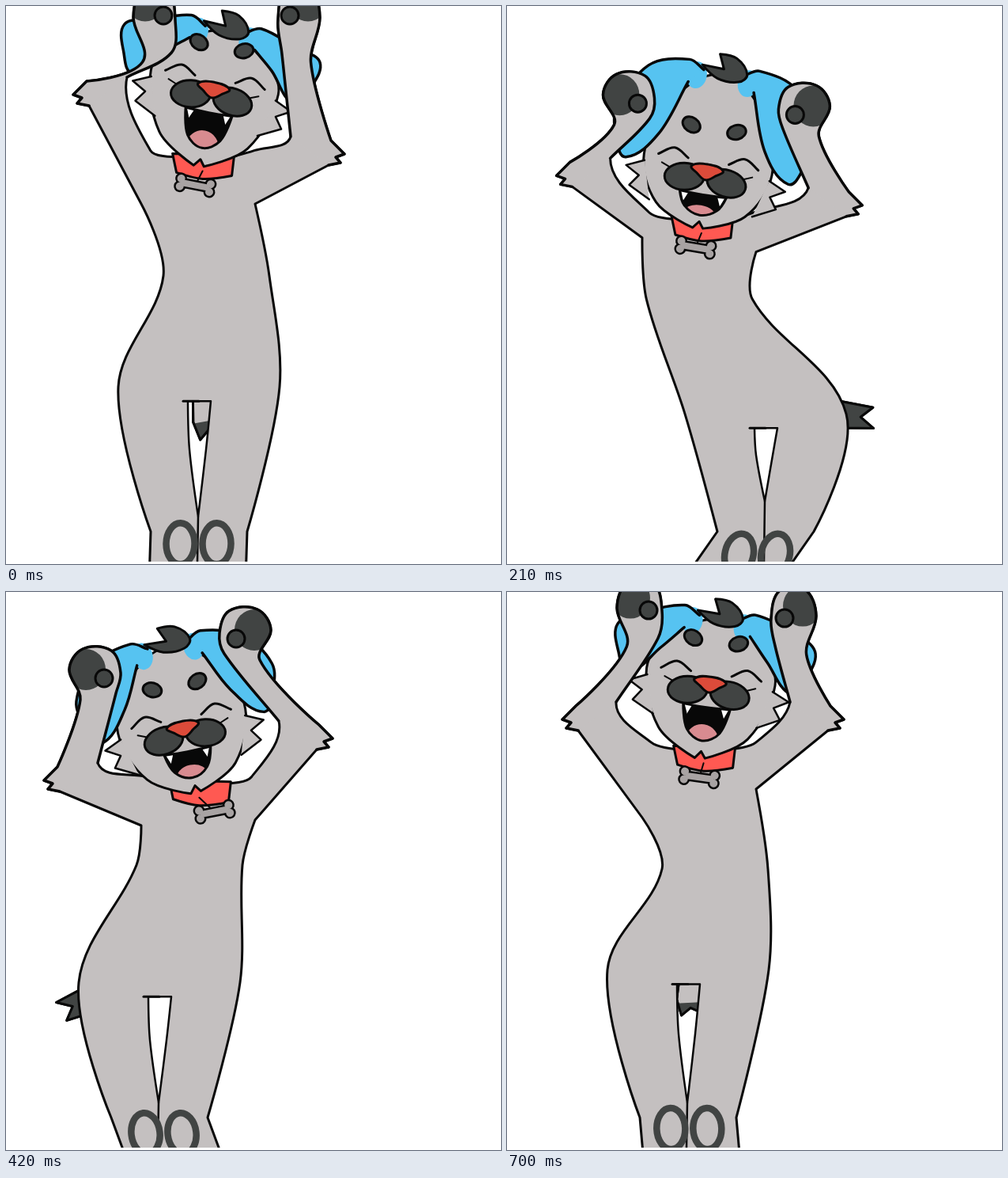
These frames come from a looping animation (626x705 px, 0.77 s). An HTML page with a canvas:

```html
<!DOCTYPE html>
<html lang="en">
<head>
<meta charset="utf-8">
<title>Dancing dog</title>
<style>
html, body { margin: 0; width: 100%; height: 100%; overflow: hidden; background: #fff; }
canvas { display: block; width: 626px; height: 705px; }
</style>
</head>
<body>
<canvas id="stage" width="626" height="705"></canvas>
<script>
const ctx = document.getElementById('stage').getContext('2d');
const STEP = 70, STEPS = 11, FLOOR = 702, RAD = Math.PI / 180;
const FUR = '#c4c0c0', DARK = '#414443', INK = '#080808', BLUE = '#56c3f1',
  RED = '#ff5952', NOSE = '#dc4b3a', TONGUE = '#d88b90';

// Key poses of the rig's joints; everything else hangs on these.
const KEYS = [0, 1, 2, 4, 6, 8, 10];
const tracks = {
  headX: [260, 258, 257, 243, 226, 238, 255], headY: [116, 189, 256, 168, 183, 222, 127],
  tilt: [11, 16, 15, 2, -11, -6, 8], chin: [86, 68, 50, 74, 70, 71, 82],
  handLX: [188, 172, 160, 148, 113, 105, 168], handLY: [20, 60, 160, 60, 102, 155, 25],
  handRX: [370, 383, 392, 350, 302, 322, 362], handRY: [20, 80, 190, 50, 52, 125, 35],
  elbowLX: [85, 75, 62, 64, 48, 40, 70], elbowLY: [112, 190, 240, 180, 238, 288, 161],
  elbowRX: [428, 434, 447, 445, 413, 422, 426], elbowRY: [187, 222, 303, 186, 185, 218, 161],
  pitL: [250, 281, 319, 262, 295, 318, 285], pitR: [250, 289, 327, 285, 288, 296, 249],
  waistX: [266, 269, 252, 236, 232, 241, 263], waistY: [341, 390, 370, 365, 345, 345, 350],
  hipX: [244, 290, 344, 286, 194, 153, 229], tail: [10, 81, 136, 4, -69, -78, 3]
};

// Between keys a joint follows a cubic through its neighbours.
function valueAt(track, step) {
  const key = s => track[KEYS.indexOf((s + STEPS) % STEPS)];
  if (KEYS.includes(step)) return key(step);
  return (9 * (key(step - 1) + key(step + 1)) - key(step - 3) - key(step + 3)) / 16;
}

function poseAt(step) {
  const p = {}, angle = 2 * Math.PI * step / STEPS;
  for (const name in tracks) p[name] = valueAt(tracks[name], step);
  p.bob = Math.cos(2 * angle - 2.44);
  p.reach = 1 + 0.5 * Math.max(0, Math.cos(angle)) ** 3;
  p.crotchY = 519 + 26 * p.bob;
  p.crown = 245 - 1.9 * p.chin;
  p.neckX = p.headX - p.chin * Math.sin(p.tilt * RAD) + 5;
  p.neckY = p.headY + p.chin * Math.cos(p.tilt * RAD);
  return p;
}

// Points are [x, y, isCorner]; side -1 mirrors a shape to the left.
const place = (pts, x = 0, y = 0, side = 1) => pts.map(([px, py, c]) => [x + side * px, y + py, c]);

function handle(at, from, to, seg) {
  if (at[2]) return [at[0], at[1]];
  const dx = to[0] - from[0], dy = to[1] - from[1], k = seg / 3 / (Math.hypot(dx, dy) || 1);
  return [at[0] + dx * k, at[1] + dy * k];
}

function curve(pts, closed) {
  const n = pts.length, path = new Path2D();
  const get = i => closed ? pts[(i + n) % n] : pts[Math.max(0, Math.min(n - 1, i))];
  path.moveTo(pts[0][0], pts[0][1]);
  for (let i = 0; i < (closed ? n : n - 1); i++) {
    const p = get(i), q = get(i + 1), seg = Math.hypot(q[0] - p[0], q[1] - p[1]);
    path.bezierCurveTo(...handle(p, get(i - 1), q, seg), ...handle(q, get(i + 2), p, seg), q[0], q[1]);
  }
  if (closed) path.closePath();
  return path;
}

function poly(...pts) {
  const path = new Path2D();
  pts.forEach(([x, y], i) => i ? path.lineTo(x, y) : path.moveTo(x, y));
  return path;
}

function oval(x, y, rx, ry, deg = 0) {
  const path = new Path2D();
  path.ellipse(x, y, rx, ry, deg * RAD, 0, 7);
  return path;
}

function paint(path, fill, width = 3, rule = 'nonzero') {
  if (fill) { ctx.fillStyle = fill; ctx.fill(path, rule); }
  if (width) { ctx.lineWidth = width; ctx.strokeStyle = INK; ctx.stroke(path); }
}

function inside(path, draw) {
  ctx.save();
  ctx.clip(path);
  draw();
  ctx.restore();
}

function turned(x, y, deg, draw) {
  ctx.save();
  ctx.translate(x, y);
  ctx.rotate(deg * RAD);
  draw();
  ctx.restore();
}

const both = draw => [-1, 1].forEach(draw);

// One half of the outline, from the foot up to the neck.
function outline(p, side) {
  const name = side < 0 ? 'L' : 'R', x = p['elbow' + name + 'X'], y = p['elbow' + name + 'Y'];
  const thin = Math.sqrt(p.reach), knee = p.hipX + side * 61;
  const hand = [[19, 34], [33, -4], [16, -30], [-20, -28], [-32, 0], [-26, 26]]
    .map(([hx, hy]) => [hx / thin, hy * p.reach]);
  const tuft = [[-20, 14, 1], [-5, 11, 1], [-11, 4, 1], [0, 0, 1], [-17, -17, 1]];
  const arm = [
    ...place(tuft, x, y, side),
    ...place(hand, p['hand' + name + 'X'], p['hand' + name + 'Y'], side),
    [x - side * 68, y - 22]
  ];
  const trunk = [
    [knee - 0.33 * (p.hipX - 240), 705, 1], [knee, 664, 1],
    [p.hipX + side * 102, p.crotchY - 18],
    [p.waistX + side * 67, p.waistY], [243 + side * 72, p['pit' + name], 1]
  ];
  const neck = place([[66, -18], [38, -10, 1]], p.neckX, p.neckY, side);
  return { arm, all: [...trunk, ...arm, ...neck] };
}

function drawTail(p) {
  const swing = Math.abs(Math.sin(p.tail * RAD)), len = 65 + 75 * swing, cut = len * (0.8 - 0.45 * swing);
  turned(p.hipX, p.crotchY - 30, -p.tail, () => {
    const shape = poly([-8, 0], [-17, len * 0.7], [-12, len], [0, len * 0.87], [14, len * 0.97], [17, len * 0.6], [8, 0]);
    paint(shape, FUR);
    inside(shape, () => { ctx.fillStyle = DARK; ctx.fillRect(-30, cut, 60, len); });
    paint(shape);
  });
}

function drawBody(p, left, right) {
  const x = p.hipX, top = p.crotchY, low = 645 - 35 * Math.max(0, p.bob), mid = (top + low) / 2 - 12;
  const body = curve([...left, ...[...right].reverse()]);
  const gap = curve([[x - 14, top, 1], [x + 15, top, 1], [x + 9, mid], [x - 1, low, 1], [x - 12, mid]], true);
  const skin = new Path2D(body);
  skin.addPath(gap);
  paint(skin, FUR, 0, 'evenodd');
  paint(body);
  paint(gap, null, 2.5);
  paint(poly([x - 20, top], [x, top]));
  paint(poly([x - 1, low], [x - 2, FLOOR]), null, 2.5);

  const lean = x - 240;
  both(s => {
    ctx.strokeStyle = DARK;
    ctx.lineWidth = 8.5;
    ctx.stroke(oval(x + s * 23 - lean * 0.12, 687 + 10 * p.bob, 18, 26, lean * 0.15));
  });
}

function drawCollar(p) {
  const band = [[-38, -14, 1], [40, -12, 1], [37, 14, 1], [0, 18], [-33, 10, 1]];
  const x = p.neckX + 5 - p.tilt * 1.3, y = p.neckY + 26;
  paint(curve(place(band, p.neckX, p.neckY), true), RED);
  paint(poly([p.neckX, y - 18], [x, y]), null, 2);
  turned(x, y, p.tilt, () => {
    const bone = new Path2D();
    bone.rect(-18, -4, 36, 8);
    both(sx => both(sy => bone.addPath(oval(sx * 19, sy * 5, 5, 5))));
    paint(bone, null, 5);
    paint(bone, '#a8a3a3', 0);
  });
}

function drawEar(crown, side) {
  const ear = [[25, -crown - 6], [45, -crown - 16], [95, -crown], [126, -70],
    [120, -35], [104, -12], [68, -48], [42, 12 - crown]];
  paint(oval(side * 33, 2 - crown, 13, 17), BLUE, 0);
  paint(curve(place(ear, 0, 0, side)), BLUE, 3.5);
}

function drawMouth(chin) {
  const low = chin * 0.75, mouth = curve([[-30, 18, 1], [0, 19], [30, 18, 1], [21, low * 0.8], [0, low], [-21, low * 0.8]], true);
  paint(mouth, INK, 0);
  inside(mouth, () => {
    paint(oval(0, low, 22, (low - 18) * 0.5), TONGUE, 2);
    both(s => paint(poly([s * 29, 16], [s * 17, 17], [s * 23, 31]), '#fff', 1.5));
  });
  paint(mouth);
}

function drawHead({ chin, crown }) {
  const half = [[60, -crown * 0.7], [82, -20], [57, chin * 0.63]];
  const tuft = [[-6, chin + 2, 1], [1, chin - 7, 1], [7, chin + 1, 1]];
  const left = place(half, 0, 0, -1);
  const cheek = [[80, -12, 1], [102, -2, 1], [84, 8, 1], [94, 22, 1], [66, 36, 1]];
  const hair = [[-30, -12, 1], [-2, -11, 1], [-10, -29, 1], [12, -27], [28, -9], [19, 2], [-8, 2]];

  paint(curve([[0, -crown - 4], ...left, ...tuft, ...[...half].reverse()], true), FUR);
  both(s => paint(curve(place(cheek, 0, 0, s)), FUR, 2.5));
  both(s => drawEar(crown, s));
  paint(curve(place(hair, 2, -crown), true), DARK);
  both(s => {
    paint(oval(s * 29, -66, 12, 9, s * -25), DARK);
    paint(curve(place([[-19, 5], [0, -5], [19, 6]], s * 45, -29, s)));
  });
  drawMouth(chin);
  both(s => {
    paint(oval(s * 27, 0, 25, 17, s * 8), DARK);
    paint(poly([s * 58, -13], [s * 48, -9]), null, 2);
  });
  paint(curve([[-20, -15], [0, -20], [20, -15], [12, -7], [0, 0], [-12, -7]], true), NOSE);
}

function drawArm(p, pts, side) {
  const name = side < 0 ? 'L' : 'R', x = p['hand' + name + 'X'], y = p['hand' + name + 'Y'];
  const lift = 30 * (p.reach - 1), arm = curve(pts);
  paint(arm, FUR, 0);
  inside(arm, () => paint(oval(x + side * 12, y - 4 - 1.5 * lift, 25, 26), DARK, 0));
  paint(oval(x - side * 11, y + 7 - lift, 11, 11), DARK);
  paint(arm, null, 3.5);
}

function draw(p) {
  ctx.fillStyle = '#fff';
  ctx.fillRect(0, 0, 626, 705);
  ctx.save();
  ctx.beginPath();
  ctx.rect(0, 0, 626, FLOOR);
  ctx.clip();
  ctx.lineJoin = ctx.lineCap = 'round';
  const left = outline(p, -1), right = outline(p, 1);
  drawTail(p);
  drawBody(p, left.all, right.all);
  drawCollar(p);
  turned(p.headX, p.headY, p.tilt, () => drawHead(p));
  drawArm(p, left.arm, -1);
  drawArm(p, right.arm, 1);
  ctx.restore();
}

let shown = -1;
function tick() {
  const step = Math.floor(performance.now() / STEP) % STEPS;
  if (step !== shown) draw(poseAt(shown = step));
  requestAnimationFrame(tick);
}
tick();
</script>
</body>
</html>
```
